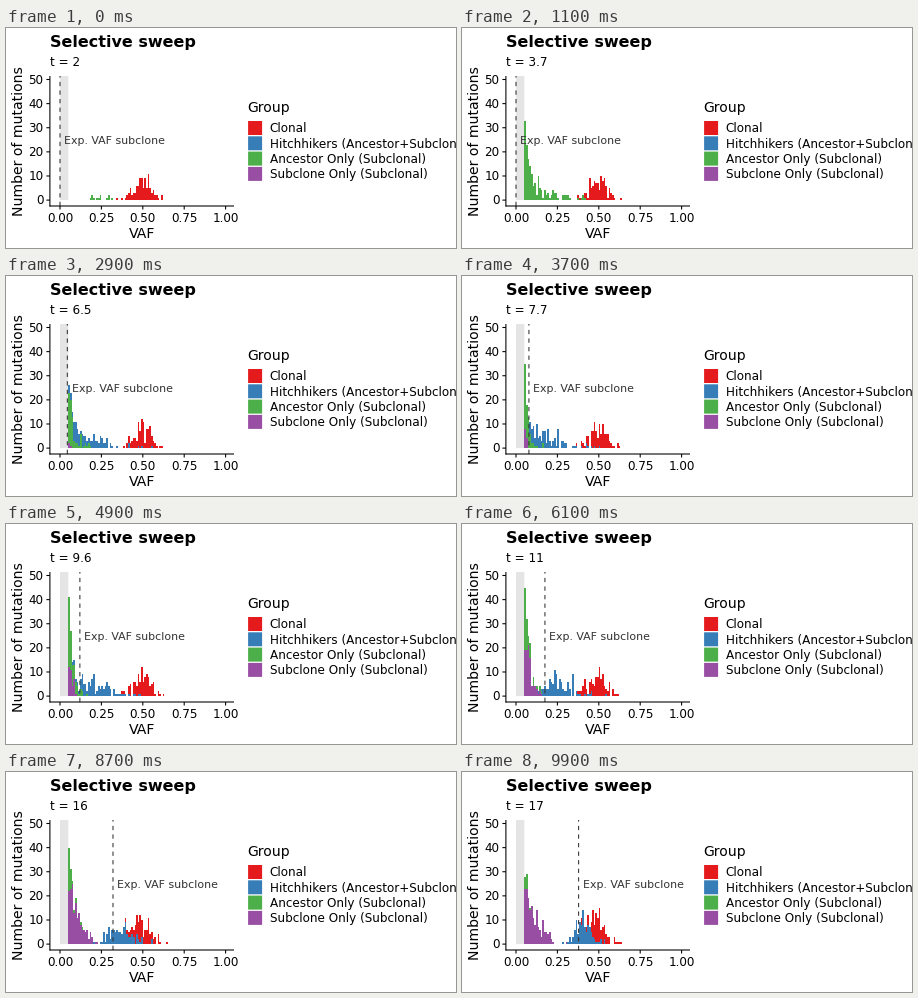
A matplotlib script for the animation above (10 s loop, 450 by 220 pixels).

```python
import numpy as np
import matplotlib.pyplot as plt
from matplotlib.animation import FuncAnimation
from matplotlib.collections import PolyCollection
from matplotlib.patches import Rectangle

W, H, DPI = 450, 220, 100
FRAMES, INTERVAL = 100, 100
LEFT, RIGHT, TOP, BOTTOM = 43.9, 228, 48, 178
RED, BLUE, GREEN, PURPLE = "#E41A1C", "#377EB8", "#4DAF4A", "#984EA3"
SOFT = "#333333"
BIRTH = 13          # step at which the subclone appears
STEP = 0.01         # histogram bin width
edges = np.arange(5, 101) * STEP
mids = edges[:-1] + STEP / 2

plt.rcParams["font.family"] = "DejaVu Sans"
fig = plt.figure(figsize=(W / DPI, H / DPI), dpi=DPI, facecolor="white")
ax = fig.add_axes([0, 0, 1, 1])
ax.set_xlim(0, W)
ax.set_ylim(H, 0)
ax.axis("off")


def px(size):
    return size * 72 / DPI


def X(vaf):
    return 54 + 165.6 * vaf


def Y(count):
    return 172.1 - 2.412 * count


def label(x, y, s, size=12, **kw):
    kw.setdefault("va", "baseline")
    return ax.text(x, y, s, fontsize=px(size), **kw)


def line(x, y, color="black", **kw):
    return ax.plot(x, y, color=color, lw=px(1.07), snap=False,
                   solid_capstyle="butt", dash_capstyle="butt", **kw)[0]


def box(x, y, w, h, color):
    ax.add_patch(Rectangle((x, y), w, h, fc=color, lw=0, snap=False))


# Static parts
box(X(0), TOP, X(0.05) - X(0), Y(0) - TOP, "#E5E5E5")
line([LEFT, LEFT], [TOP, BOTTOM + 0.5], zorder=5)
line([LEFT - 0.5, RIGHT], [BOTTOM, BOTTOM], zorder=5)
for v in (0, 0.25, 0.5, 0.75, 1):
    line([X(v)] * 2, [BOTTOM, BOTTOM + 3.5])
    label(X(v), 194, f"{v:.2f}", ha="center")
for n in range(0, 51, 10):
    line([LEFT - 3.5, LEFT], [Y(n)] * 2)
    label(37.5, Y(n) + 4.3, str(n), ha="right")

label(44, 19.2, "Selective sweep", 16, weight="bold")
label(136, 210.3, "VAF", 14, ha="center")
label(17.5, 112.8, "Number of mutations", 14, rotation=90, ha="center",
      rotation_mode="anchor")
label(241.7, 84, "Group", 14)
groups = [("Clonal", RED), ("Hitchhikers (Ancestor+Subclonal)", BLUE),
          ("Ancestor Only (Subclonal)", GREEN), ("Subclone Only (Subclonal)", PURPLE)]
for k, (name, color) in enumerate(groups):
    mid = 100 + 15.3 * k
    box(242.1, mid - 7, 14, 14, color)
    label(263.7, mid + 4.4, name)

# Moving parts, stacked from the bottom up
bars = [PolyCollection([], facecolors=c, edgecolors="none", linewidths=0, zorder=2)
        for c in (PURPLE, GREEN, BLUE, RED)]
for b in bars:
    ax.add_collection(b, autolim=False)
clock = label(44, 38, "")
marker = line([X(0)] * 2, [BOTTOM, TOP], SOFT, linestyle=(0, (4, 4)), zorder=4)
note = label(58.5, 116, "Exp. VAF subclone", 11, color=SOFT, zorder=6)

# Frequencies of passenger mutations before the sweep
passengers = 0.02 + 0.26 * np.linspace(0, 1, 92) ** 1.5
founders = np.repeat([0.2, 0.42], 6)


def expected_vaf(i):
    return np.interp(i, [BIRTH, 22, 33, 37, 44, 49, 55, 66, 73, 77, 87, 99],
                     [0, 0.022, 0.057, 0.078, 0.1, 0.12, 0.142, 0.202, 0.239,
                      0.262, 0.32, 0.378])


def sequenced(rng, v):
    """Histogram of noisy readings at about 100x depth."""
    return np.histogram(rng.normal(v, np.sqrt(v * (1 - v) / 100)), edges)[0]


def counts(i):
    rng = np.random.default_rng(700 + i)
    vaf = expected_vaf(i)
    share = 2 * vaf
    rarest = 0.25 * np.exp(-i / 6)

    clonal = sequenced(rng, np.full(100, 0.5))
    early = 0.25 + (founders - 0.25) * min(i / 12, 1)
    seen = np.concatenate([passengers[passengers > 1.15 * rarest], early])
    hitch = sequenced(rng, vaf + seen * (1 - share))

    tail = 32 * (1 - share) * (0.055 / mids) ** (3 + 2 * share)
    tail *= np.exp(-(mids / 0.2) ** 4) / (1 + (rarest / mids) ** 6)
    ancestor = rng.poisson(tail)
    reach = 0.03 + 0.45 * vaf
    young = 25 * min(1, 6 * vaf) * (0.055 / mids) * np.exp(-(mids / reach) ** 4)
    subclone = rng.poisson(young)

    if i < BIRTH:
        ancestor, hitch = ancestor + hitch, 0 * hitch
    return subclone, ancestor, hitch, clonal


def update(i):
    base = np.zeros(len(mids))
    for coll, n in zip(bars, counts(i)):
        top = base + n
        coll.set_verts([
            [(X(a), Y(lo)), (X(a + STEP), Y(lo)), (X(a + STEP), Y(hi)), (X(a), Y(hi))]
            for a, lo, hi in zip(edges, base, top) if hi > lo])
        base = top
    x = X(expected_vaf(i))
    marker.set_xdata([x, x])
    note.set_x(x + 4.2)
    clock.set_text(f"t = {2 + 0.1553 * i:.2g}")
    return [*bars, marker, note, clock]


anim = FuncAnimation(fig, update, frames=FRAMES, interval=INTERVAL,
                     repeat=True, repeat_delay=0, blit=False)
plt.show()
```
